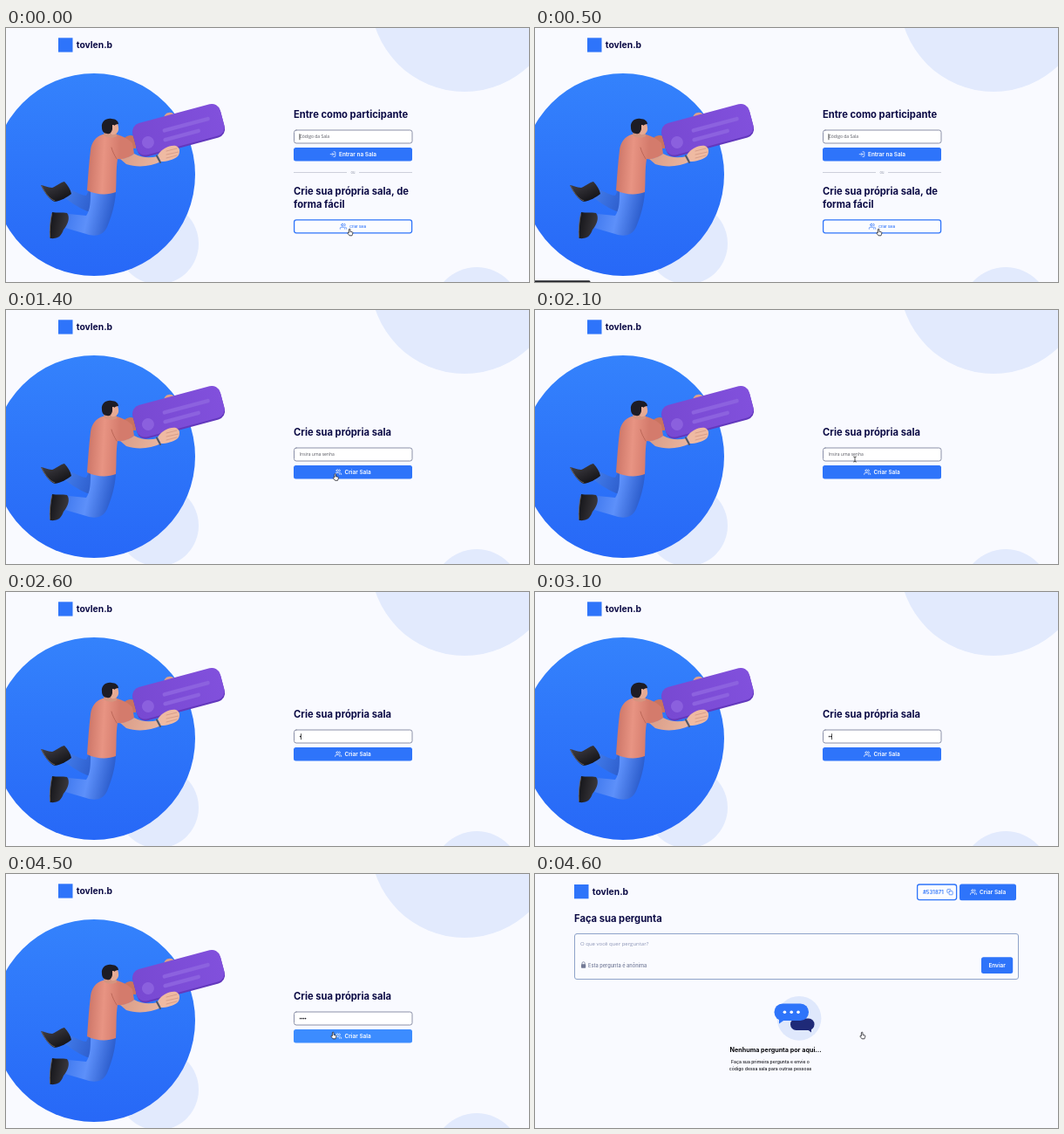
An HTML page with a canvas for the animation above (4.7 s loop, 600 by 291 pixels).

```html
<!DOCTYPE html>
<html lang="pt-BR">
<head>
<meta charset="utf-8">
<title>Criar sala</title>
<style>
  html, body { margin: 0; width: 100%; height: 100%; overflow: hidden; background: #f9faff; }
  canvas { display: block; width: 600px; height: 291px; }
</style>
</head>
<body>
<canvas id="stage"></canvas>
<script>
const LOOP = 4700, STEP = 100, W = 600, H = 291;
const BLUE = '#2e74fa', NAVY = '#0c0b45', PALE = '#e2eafd', PAGE = '#f9faff';
const UI = 'Inter, sans-serif', FIELD = '"Open Sans", sans-serif';

const canvas = document.getElementById('stage');
const ctx = canvas.getContext('2d');
const ratio = window.devicePixelRatio || 1;
canvas.width = W * ratio;
canvas.height = H * ratio;

const ICONS = {
  users: 'M17 21v-2a4 4 0 0 0-4-4H5a4 4 0 0 0-4 4v2M23 21v-2a4 4 0 0 0-3-3.9M16 3.1a4 4 0 0 1 0 7.8M5 7a4 4 0 1 0 8 0a4 4 0 1 0-8 0',
  enter: 'M15 3h4a2 2 0 0 1 2 2v14a2 2 0 0 1-2 2h-4M10 17l5-5-5-5M15 12H3',
  copy: 'M11 9h9a2 2 0 0 1 2 2v9a2 2 0 0 1-2 2h-9a2 2 0 0 1-2-2v-9a2 2 0 0 1 2-2zM5 15H4a2 2 0 0 1-2-2V4a2 2 0 0 1 2-2h9a2 2 0 0 1 2 2v1'
};

const lerp = (a, b, k) => a + (b - a) * k;
const clamp = v => Math.max(0, Math.min(1, v));

function disc(x, y, r, color) {
  ctx.beginPath();
  ctx.arc(x, y, r, 0, 7);
  ctx.fillStyle = color;
  ctx.fill();
}

function box(x, y, w, h, r, fill, stroke, width = 1) {
  ctx.beginPath();
  ctx.roundRect(x, y, w, h, r);
  if (fill) { ctx.fillStyle = fill; ctx.fill(); }
  if (stroke) { ctx.strokeStyle = stroke; ctx.lineWidth = width; ctx.stroke(); }
}

function shape(d, fill, stroke, width = 1) {
  const path = new Path2D(d);
  if (fill) { ctx.fillStyle = fill; ctx.fill(path); }
  if (stroke) {
    ctx.strokeStyle = stroke;
    ctx.lineWidth = width;
    ctx.lineCap = ctx.lineJoin = 'round';
    ctx.stroke(path);
  }
}

function fade(x0, y0, x1, y1, ...colors) {
  const g = ctx.createLinearGradient(x0, y0, x1, y1);
  colors.forEach((c, i) => g.addColorStop(i / (colors.length - 1), c));
  return g;
}

// y is the middle of the capital letters
function text(str, x, y, size, color = NAVY, weight = 700, family = UI, align = 'left') {
  ctx.font = `${weight} ${size}px ${family}`;
  ctx.textAlign = align;
  ctx.fillStyle = color;
  ctx.fillText(str, x, y + size * 0.36);
}

function placed(x, y, scale, draw) {
  ctx.save();
  ctx.translate(x, y);
  ctx.scale(scale, scale);
  draw();
  ctx.restore();
}

function icon(name, x, y, size, color) {
  placed(x - size / 2, y - size / 2, size / 24, () => shape(ICONS[name], null, color, 2.2));
}

function brand(x, y) {
  ctx.fillStyle = BLUE;
  ctx.fillRect(x, y, 16.5, 16.3);
  text('tovlen.b', x + 20.8, y + 7.8, 10.3);
}

function backdrop() {
  ctx.fillStyle = PAGE;
  ctx.fillRect(0, 0, W, H);
}

function person() {
  const skin = fade(130, 140, 200, 160, '#d99b86', '#f2c3ac');
  const jeans = fade(70, 200, 122, 212, '#3f78ee', '#5d90fa', '#2c5dcc');

  // far hand and arm
  shape('M181 104 C181 98 187 95 192 98 L193 105 Z', '#dda08a');
  shape('M136 126 C142 121 147 123 150 128 L149 138 L134 138 Z', '#c9735f');

  // far leg
  shape('M95 186 L118 188 C114 203 108 211 100 211 C91 211 79 203 68 195 L74 185 C82 189 88 192 92 192 Z', fade(70, 190, 110, 205, '#4079e8', '#2856c4'));
  shape('M40 180 C43 180 48 183 53 183 C58 181 62 177 67 176 C71 180 74 185 75 190 C70 194 63 198 56 199 C50 197 43 187 40 180 Z', fade(50, 178, 60, 199, '#3c3a40', '#151519'));
  shape('M41 181 C45 189 50 196 56 198', null, '#6b6562', .9);

  // near leg
  shape('M97 186 L126 188 C125 203 121 216 116 228 C111 239 101 239 92 236 L68 229 L72 213 L92 215 C97 208 97 198 97 186 Z', jeans);
  shape('M53 211 C58 212 65 211 70 212 C74 217 71 225 66 231 C64 236 62 239 59 240 C56 241 52 242 50 240 C50 231 51 220 53 211 Z', fade(50, 220, 72, 224, '#151519', '#3b393e'));
  shape('M52.5 213 C50.5 222 50 232 50.5 239.5', null, '#6b6562', .9);

  // shirt
  shape('M111 122 C103 124 98 131 97 140 C95 156 94 172 93 186 C103 191 116 192 126 188 C127 174 126 162 128 150 C136 151 142 148 147 144 L145 132 C138 125 128 121 120 121 Z', fade(94, 150, 130, 152, '#cc7567', '#e89483', '#d47b6c'));
  shape('M127 150 C124 145 122 141 121 137', null, '#bd6859', 1);

  // board
  ctx.save();
  ctx.translate(198, 117);
  ctx.rotate(-Math.PI / 12);
  box(-52, -18, 104, 38, 10, '#6338bd');
  box(-52, -19.5, 104, 37.5, 10, fade(-50, 0, 50, 0, '#7849d2', '#8150dc'));
  disc(-37.5, 4.5, 7, '#8b60de');
  box(-18, -6, 56, 4.4, 2.2, '#8c62df');
  box(-20, 4.5, 44, 4.4, 2.2, '#8c62df');
  ctx.restore();

  // near forearm and hand
  shape('M131 150 C135 150 142 148 147 144 C156 149 165 149 174 147 L178 153 C166 159 150 160 138 156 Z', skin);
  shape('M174 146 C179 138 187 134 195 135 C200 137 200 143 197 147 C192 151 184 153 178 153 Z', '#efbaa2');
  shape('M184 141 L196 138 M184 145 L198 142 M184 149 L196 146', null, '#cf937e', .7);
  shape('M173 146.5 L177 154', null, '#555762', 2);

  // neck and head
  shape('M113 117 L126 117 L127 124 C122 127 116 126 112 123 Z', '#d49580');
  shape('M114 109 C120 104 129 107 129 114 C130 119 126 123 121 122 Z', '#e5aa94');
  shape('M110 114 C109 107 115 103 121 104 C126 104 129 107 129 110 C126 110 123 112 122 116 C121 119 120 122 116 121 C112 121 110 118 110 114 Z', '#1d1c25');
  shape('M122 111 C126 110 126 117 122 117 Z', '#e8ae98');
}

function landing() {
  backdrop();
  disc(526, -34.8, 107.8, PALE);
  disc(540, 325, 51, PALE);
  disc(174.5, 247, 46.5, PALE);
  disc(101, 168, 116, fade(0, 52, 0, 284, '#3482fc', '#2768f7'));
  person();
  brand(60, 11.3);
}

function field(y, label, caretX) {
  box(330.5, y, 135.5, 15, 2.5, '#fff', '#8b90a8', 1);
  if (label) text(label, 336.7, y + 7.6, 5, '#55565f', 400, FIELD);
  if (caretX) {
    ctx.fillStyle = '#111';
    ctx.fillRect(caretX - .3, y + 4.2, .7, 7);
  }
}

function homePage() {
  landing();
  text('Entre como participante', 330, 99.2, 11.2);
  field(117, 'Código da Sala', 336.9);
  box(330, 137, 136, 15.6, 2.5, BLUE);
  icon('enter', 375, 144.6, 7.5, '#fff');
  text('Entrar na Sala', 382, 144.5, 6.45, '#fff', 600);
  ctx.fillStyle = '#b9bdcb';
  ctx.fillRect(330, 165.2, 61, .7);
  ctx.fillRect(405, 165.2, 61, .7);
  text('ou', 398, 165.5, 4.2, '#9297a8', 400, UI, 'center');
  text('Crie sua própria sala, de', 330, 186.6, 11.2);
  text('forma fácil', 330, 202.2, 11.2);
  box(330.6, 219.8, 135, 15, 2.5, '#fbfcff', BLUE, 1.3);
  icon('users', 387, 227.2, 8, BLUE);
  text('Criar Sala', 394, 227.2, 4.1, BLUE, 500);
}

function createPage(t) {
  landing();
  text('Crie sua própria sala', 330, 140.4, 11.2);

  const typed = [2600, 3100, 3200, 3500].filter(at => t >= at).length;
  const caret = t >= 2300 && t < 4100 ? 336.6 + typed * 2 : 0;
  field(158, typed ? '' : 'Insira uma senha', caret);
  for (let i = 0; i < typed; i++) disc(337.6 + i * 2, 165.6, .8, '#15151c');

  const glow = clamp((t - 3700) / 500);
  const color = `rgb(${lerp(46, 60, glow)}, ${lerp(116, 140, glow)}, ${lerp(250, 255, glow)})`;
  box(330, 178, 136, 15.6, 2.5, color);
  icon('users', 381.2, 185.6, 7.6, '#fff');
  text('Criar Sala', 388.5, 185.5, 6.45, '#fff', 600);
}

function roomPage() {
  backdrop();
  brand(45, 12);
  box(438.6, 12, 45, 17.6, 2.5, '#fbfcff', BLUE, 1.3);
  text('#531871', 445, 20.6, 6, BLUE, 600);
  icon('copy', 476, 20.6, 7.6, BLUE);
  box(487, 11.4, 65, 18.8, 2.5, BLUE);
  icon('users', 503, 20.6, 7.6, '#fff');
  text('Criar Sala', 510, 20.6, 6.45, '#fff', 600);

  text('Faça sua pergunta', 45, 50.6, 11.2);
  box(45.5, 68.5, 509, 52, 2.5, '#fafbff', '#8ea3c9', 1);
  text('O que você quer perguntar?', 52, 79.6, 6, '#8b94b5', 400, FIELD);
  box(53, 103.3, 5.2, 4.4, .8, '#737a95');
  shape('M54 103.5v-1.2a1.6 1.6 0 0 1 3.2 0v1.2', null, '#737a95', .8);
  text('Esta pergunta é anônima', 61, 104.6, 5.7, '#737b98', 500);
  box(512, 95.2, 36.2, 18.8, 2.5, BLUE);
  text('Enviar', 530.1, 104.6, 6.45, '#fff', 600, UI, 'center');

  disc(303, 165.3, 25.4, '#dfe8fc');
  box(293, 165.5, 27.5, 13.5, 6.5, '#1f2a78');
  shape('M311 177 L317 181.5 L317 176 Z', '#1f2a78');
  box(274.5, 148.5, 39.5, 19.5, 9.5, BLUE);
  shape('M280 163 L280 171.5 L288 166 Z', BLUE);
  for (let i = 0; i < 3; i++) disc(286.4 + i * 7.8, 158.2, 1.8, '#fff');

  text('Nenhuma pergunta por aqui...', 276, 201.6, 7.2, '#08080c', 700, UI, 'center');
  text('Faça sua primeira pergunta e envie o', 270, 215.2, 5.1, '#17171d', 500, UI, 'center');
  text('código dessa sala para outras pessoas', 270, 222.9, 5.1, '#17171d', 500, UI, 'center');
}

const POINTERS = {
  hand: () => shape('M-1.6 .2V-3a.8 .8 0 0 1 1.6 0V-.7L2.3-.2Q3 0 2.9 .8L2.5 2.4L2 3.8H-1L-3 1.2Q-3.2 .2-2.4 .1Z', '#fff', '#16161c', .75),
  arrow: () => shape('M0 0V6L1.4 4.8L2.4 6.9L3.4 6.4L2.5 4.4H4.3Z', '#111', '#fff', .35),
  beam: () => shape('M-1.4-3Q0-3 0-2Q0-3 1.4-3M0-2V2M-1.4 3Q0 3 0 2Q0 3 1.4 3', null, '#222', .75)
};

const TRACK = [
  [0, 395, 234], [600, 395, 234], [800, 387, 234], [1200, 390, 212],
  [1600, 367, 171], [3500, 367, 171], [3900, 376, 185], [LOOP, 376, 185]
];

function pointer(t) {
  if (t >= 2600 && t < 3600) return;
  const i = TRACK.findIndex(p => p[0] > t);
  const [t0, x0, y0] = TRACK[i - 1], [t1, x1, y1] = TRACK[i];
  const k = (t - t0) / (t1 - t0);
  const x = lerp(x0, x1, k), y = lerp(y0, y1, k);
  let kind = 'hand';
  if (t >= 700 && t < 4600) kind = y > 193.6 ? 'arrow' : y > 176 ? 'hand' : 'beam';
  placed(x, y, kind === 'arrow' ? .85 : 1, POINTERS[kind]);
}

function render(t) {
  ctx.setTransform(ratio, 0, 0, ratio, 0, 0);
  if (t < 700) homePage();
  else if (t < 4600) createPage(t);
  else roomPage();
  if (t >= 300 && t < 1100) box(-2, 289.2, 65.5, 4, 1.5, '#25262b');
  pointer(t);
}

const start = performance.now();
function tick() {
  const t = (performance.now() - start) % LOOP;
  render(Math.floor(t / STEP) * STEP);
  requestAnimationFrame(tick);
}
tick();
</script>
</body>
</html>
```
